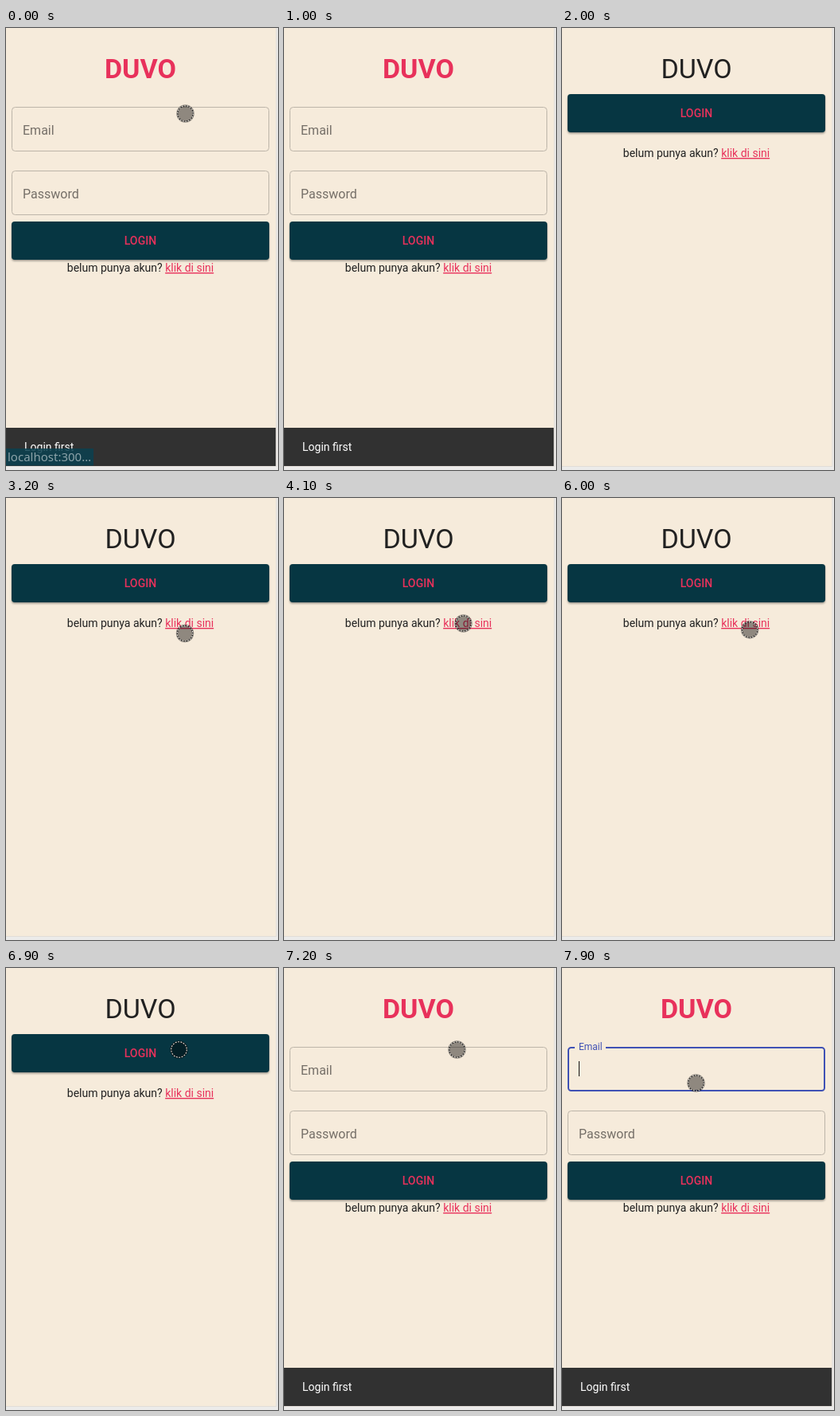
These frames come from a looping animation (342 px wide and 555 px high, 8 s). An HTML page:

```html
<!DOCTYPE html>
<html lang="id">
<head>
<meta charset="utf-8">
<title>Login</title>
<style>
  html, body { margin: 0; width: 100%; height: 100%; overflow: hidden; background: #ecebea; }
  svg { display: block; width: 342px; height: 555px; font: 14px Roboto, Arial, sans-serif; }
  .title { font-size: 34px; text-anchor: middle; fill: #212121; }
  .bold { font-weight: 700; fill: #e8315b; }
  .button { font-weight: 500; letter-spacing: .1px; text-anchor: middle; fill: #e8315b; }
  .note { text-anchor: middle; fill: #212121; }
  .link { fill: #e8315b; text-decoration: underline; }
  .label { font-size: 16px; fill: #756f68; }
  .small { font-size: 12px; fill: #3f51b5; }
  .status { font: 15px "Noto Sans", sans-serif; fill: #8ca3a9; }
  .field { fill: none; stroke: #bdb5a9; }
  .hover { stroke: #292725; }
</style>
</head>
<body>
<svg viewBox="0 0 342 555">
  <defs>
    <filter id="shadow" x="-5%" y="-20%" width="110%" height="150%" color-interpolation-filters="sRGB">
      <feDropShadow dx="0" dy="1.5" stdDeviation="1.2" flood-opacity=".38"/>
    </filter>
    <g id="action">
      <rect x="7" y="83" width="324" height="48" rx="4" fill="#063642" filter="url(#shadow)"/>
      <text class="button" x="169" y="112">LOGIN</text>
    </g>
    <text id="signup" class="note" x="169" y="162">belum punya akun? <tspan class="link">klik di sini</tspan></text>
  </defs>

  <rect width="342" height="555" fill="#f6ebdb"/>

  <g id="home">
    <text class="title" x="169" y="63">DUVO</text>
    <use href="#action"/>
    <use href="#signup"/>
  </g>

  <g id="login">
    <text class="title bold" x="169" y="63">DUVO</text>
    <g id="idle">
      <rect id="email" class="field" x="7.5" y="99.5" width="323" height="55" rx="4"/>
      <text class="label" x="21" y="134">Email</text>
    </g>
    <g id="focus">
      <rect x="8" y="100" width="322" height="54" rx="3.5" fill="none" stroke="#3f51b5" stroke-width="2"/>
      <rect x="16" y="97" width="39" height="5" fill="#f6ebdb"/>
      <text class="small" x="21" y="103">Email</text>
      <rect x="21" y="117" width="1" height="19" fill="#111"/>
    </g>
    <rect class="field" x="7.5" y="179.5" width="323" height="55" rx="4"/>
    <text class="label" x="21" y="214">Password</text>
    <use href="#action" y="160"/>
    <use href="#signup" y="144"/>
    <rect y="502" width="339.5" height="48" fill="#313131" filter="url(#shadow)"/>
    <text x="23" y="531" fill="#fff">Login first</text>
  </g>

  <path d="M339.5 0H342V555H0V550H339.5Z" fill="#ecebea"/>
  <path d="M340 0V550.5H0" fill="none" stroke="#e1ddd8"/>

  <g id="status">
    <rect y="528" width="110" height="21.5" fill="#0b4050" fill-opacity=".86"/>
    <text class="status" x="2" y="544">localhost:300…</text>
  </g>

  <g id="touch">
    <circle r="11.2" fill="#000" fill-opacity=".42"/>
    <circle r="9.8" fill="none" stroke="#141414" stroke-width="1.1"/>
    <circle r="9.8" fill="none" stroke="#e4dfd9" stroke-width="1.1" stroke-dasharray="1.9 1.52"/>
  </g>
</svg>
<script>
  const LOOP = 8000, STEP = 100;
  const el = id => document.getElementById(id);
  const show = (id, on) => el(id).style.display = on ? "" : "none";
  const easeOut = k => 1 - (1 - k) ** 2;

  // Pointer strokes: first move, destination, steps taken to get there
  const strokes = [
    { at: 0, x: 225.5, y: 107.5 },
    { at: 400, x: 80, y: 8, steps: 4 },
    { at: 2400, x: 26, y: 97 },
    { at: 3000, x: 224.5, y: 151 },
    { at: 3200, x: 225, y: 170 },
    { at: 3400, x: 252, y: 157, steps: 4 },
    { at: 3900, x: 225.5, y: 157.5, steps: 3 },
    { at: 5400, x: 127.5, y: 212.5 },
    { at: 5600, x: 217.5, y: 171, steps: 3 },
    { at: 6000, x: 251, y: 161, steps: 3 },
    { at: 6600, x: 217.5, y: 102.5, steps: 2 },
    { at: 7400, x: 168.5, y: 144.5, steps: 4 }
  ];

  function pointerAt(t) {
    const i = strokes.findLastIndex(stroke => stroke.at <= t);
    const { at, x, y, steps = 1 } = strokes[i];
    const from = strokes[i - 1] ?? strokes[i];
    const taken = Math.floor((t - at) / STEP) + 1;
    const k = easeOut(Math.min(1, taken / steps));
    return [from.x + (x - from.x) * k, from.y + (y - from.y) * k];
  }

  function draw(t) {
    const home = t >= 2000 && t < 7200;
    const focused = t >= 7900;
    show("home", home);
    show("login", !home);
    show("status", t < 100);
    show("idle", !focused);
    show("focus", focused);
    el("email").classList.toggle("hover", t >= 7700);
    show("touch", t < 900 || t >= 2400);
    el("touch").setAttribute("transform", `translate(${pointerAt(t)})`);
  }

  const start = performance.now();
  function tick() {
    draw((performance.now() - start) % LOOP);
    requestAnimationFrame(tick);
  }
  tick();
</script>
</body>
</html>
```
